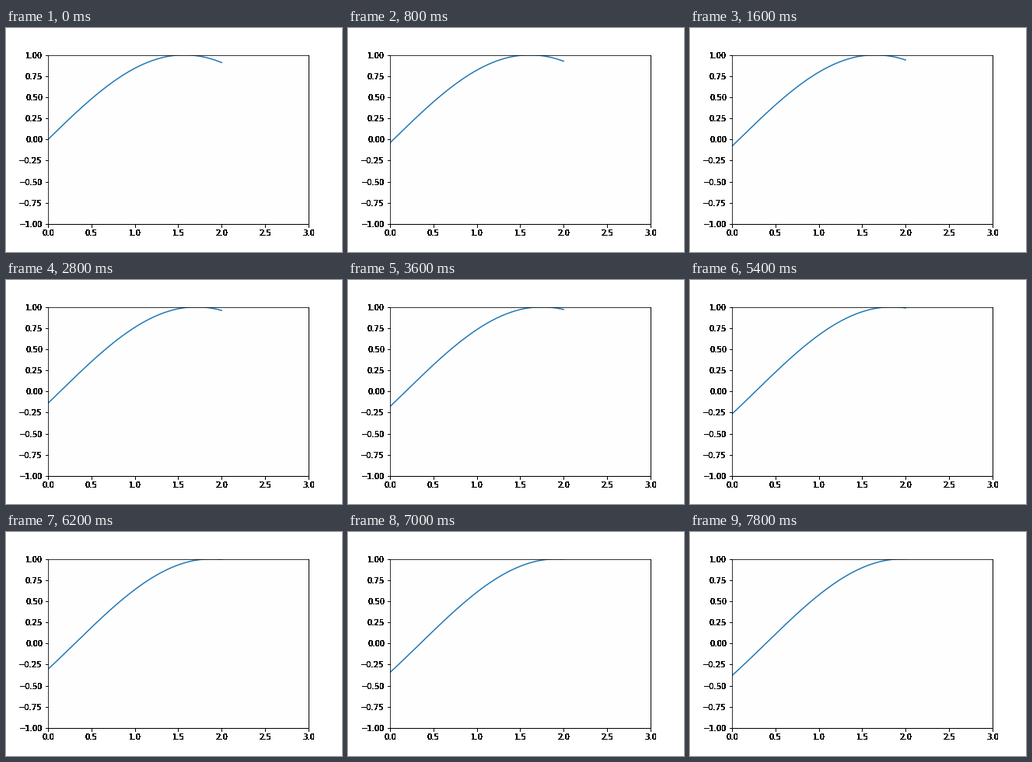
A matplotlib script for the animation above (8 s loop, 432 px wide and 288 px high).

```python
import numpy as np
import matplotlib.pyplot as plt
from matplotlib.animation import FuncAnimation

FRAMES = 40
INTERVAL = 200
PHASE_STEP = 0.01

plt.rcParams["font.family"] = "DejaVu Sans"


def harden(img, dpi):
    """Turn soft edges into solid black, for crisp heavy marks."""
    out = img.copy()
    out[..., :3] = 0
    out[..., 3] = (img[..., 3] > 0.1).astype(out.dtype)
    return out, 0, 0


fig = plt.figure(figsize=(6, 4), dpi=72, facecolor="white")
ax = fig.add_axes([0.125, 0.125, 0.775, 0.755], facecolor="#fefefe")
ax.set(xlim=(0, 3), ylim=(-1, 1))
ax.set_xticks(np.arange(0, 3.1, 0.5))
ax.set_yticks(np.arange(-1, 1.1, 0.25))

for axis in (ax.xaxis, ax.yaxis):
    for mark in [*axis.get_ticklabels(), *axis.get_ticklines()]:
        mark.set_agg_filter(harden)
for side in ("right", "bottom"):
    ax.spines[side].set_agg_filter(harden)

x = np.linspace(0, 2, 1000)
line, = ax.plot([], [], color="#1f77b4", lw=1.5)


def init():
    line.set_data([], [])
    return line,


def update(i):
    line.set_data(x, np.sin(x - PHASE_STEP * i))
    return line,


anim = FuncAnimation(fig, update, frames=FRAMES, init_func=init,
                     interval=INTERVAL, repeat=True, repeat_delay=0)

plt.show()
```
